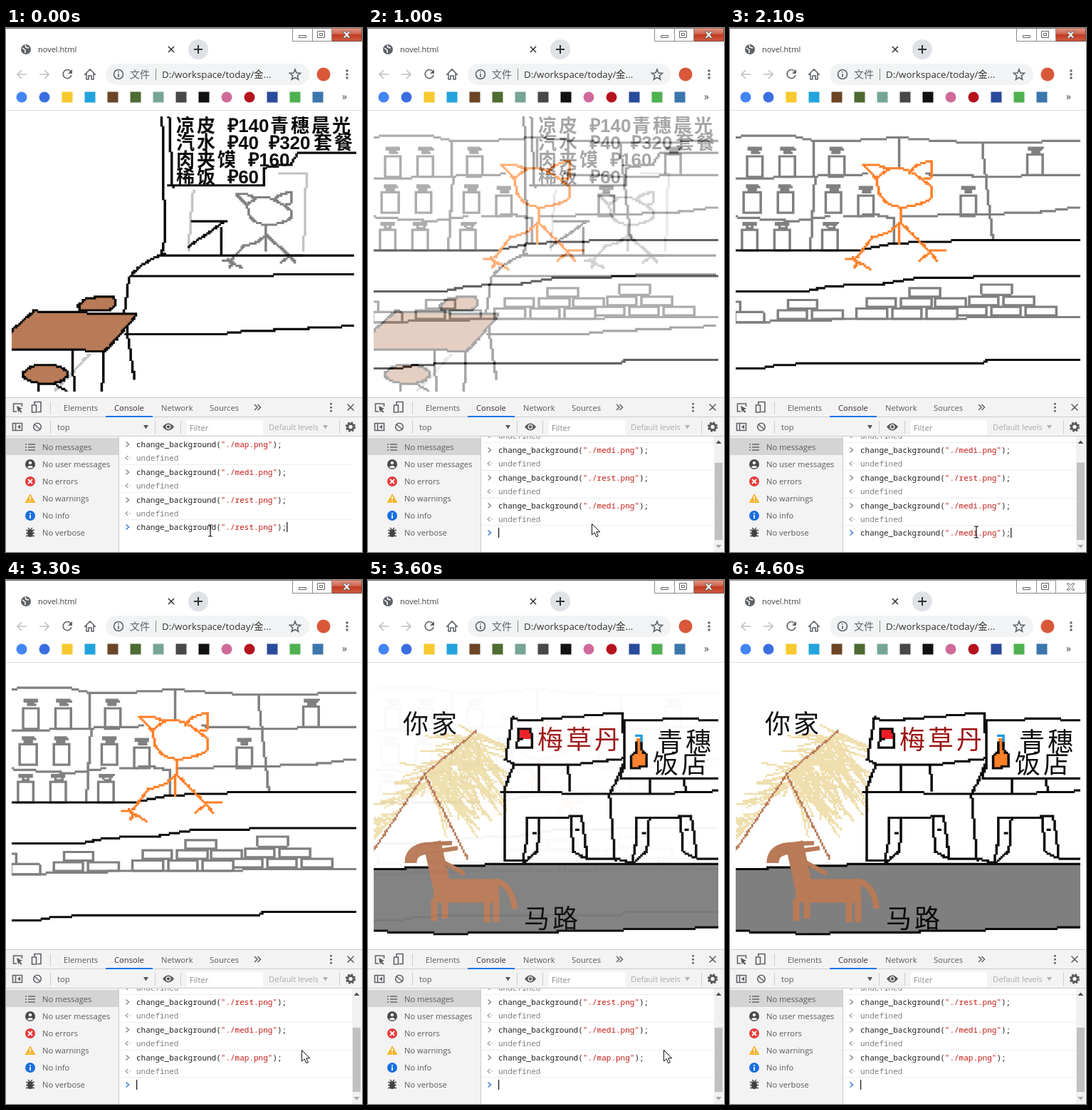
Write an HTML page that moves like this. It is 500 px wide and 735 px high and loops after 4.7 s.

```html
<!DOCTYPE html>
<html lang="zh-CN">
<head>
<meta charset="utf-8">
<title>novel.html</title>
<style>
html, body { margin: 0; width: 100%; height: 100%; overflow: hidden; background: #fff; }
svg { display: block; }
text { font-family: "Open Sans", "Noto Sans CJK SC", "Noto Sans CJK", sans-serif; white-space: pre; }
.ui { font-size: 11.2px; fill: #5a5a5a; }
.code text { font: 11px "Noto Sans Mono", monospace; fill: #222; }
.code .str { fill: #c41a16; }
.code .dim { fill: #808080; }
.hand, .menu { font-family: "Noto Sans CJK SC", "Noto Sans CJK", sans-serif; }
.hand { font-size: 36px; font-weight: 500; letter-spacing: 4px; }
.menu { font-size: 26px; font-weight: bold; letter-spacing: 3px; }
.price { font-family: "Liberation Sans", sans-serif; font-size: 26px; font-weight: bold; }
.ico { fill: none; stroke: #5f6368; stroke-width: 1.6; }
</style>
</head>
<body>
<svg id="stage" width="500" height="735" viewBox="0 0 500 735">
  <defs>
    <clipPath id="page"><rect x="8" y="124" width="484" height="386"/></clipPath>
    <clipPath id="log"><rect x="159" y="573" width="341" height="162"/></clipPath>
    <linearGradient id="red" x2="0" y2="1">
      <stop stop-color="#e39a8a"/><stop offset=".45" stop-color="#d0654f"/>
      <stop offset=".5" stop-color="#c03a22"/><stop offset="1" stop-color="#cf5a3f"/>
    </linearGradient>
  </defs>
  <rect width="500" height="735" fill="#fff"/>

  <!-- window frame and tab -->
  <path id="edge" d="M0 .5H500" stroke="#666"/>
  <path id="close" d="M457.5 0V18.5H499.5V0z" fill="url(#red)" stroke="#7b4a42"/>
  <path d="M402.5 0V18.5H457.5V0M430.5 0V18.5" fill="none" stroke="#8a8a8a"/>
  <g fill="#fff" stroke="#666">
    <path d="M411.5 10.5h10v3h-10zM437.5 4.5h10v9h-10zM440.5 7.5h4v3h-4z"/>
    <path d="M473 5h3.5l2 2.5 2-2.5h3.5l-3.7 4.5 3.7 4.5h-3.5l-2-2.5-2 2.5h-3.5l3.7-4.5z"/>
  </g>
  <circle cx="28" cy="30" r="7" fill="#5f6368"/>
  <path d="M23 28l4 3v4M27 24l1 3 4 1" fill="none" stroke="#fff" stroke-width="1.5"/>
  <text x="45" y="34" font-size="11" fill="#3c4043">novel.html</text>
  <path class="ico" d="M228 26l8 8M236 26l-8 8" style="stroke:#333"/>
  <circle cx="270" cy="30" r="14" fill="#dee1e6"/>
  <path d="M264 30h12M270 24v12" stroke="#333" stroke-width="2"/>

  <!-- navigation -->
  <path class="ico" d="M29 65H16M22 59l-6 6 6 6M47 65h13M54 59l6 6-6 6" style="stroke:#bfc1c4"/>
  <path class="ico" d="M91 61A6 6 0 1 0 92 66"/><path d="M93 58v6h-6z" fill="#5f6368"/>
  <path class="ico" d="M110 66l8-8 8 8M113 64v8h3v-5h4v5h3v-8"/>
  <rect x="140" y="50" width="286" height="30" rx="15" fill="#f1f3f4"/>
  <circle class="ico" cx="158" cy="65" r="6.5"/><path class="ico" d="M158 64v5M158 61v1.500"/>
  <text x="174" y="70" font-size="14" fill="#5f6368">文件</text>
  <path d="M210.5 57V73" stroke="#888"/>
  <text x="219" y="70" font-size="13.3" fill="#333">D:/workspace/today/金...</text>
  <path class="ico" d="M406 58l2 5 5.500.4-4.200 3.600 1.300 5.300-4.600-2.900-4.600 2.900 1.300-5.300-4.200-3.600 5.500-.4z"/>
  <circle cx="446" cy="65" r="9.5" fill="#d9583a"/>
  <path d="M479 58.500v13" stroke="#5f6368" stroke-width="3" stroke-dasharray="3 2"/>
  <g id="marks"></g>
  <text x="472" y="101" font-size="14" fill="#444">»</text>
  <path d="M0 115.500H500" stroke="#dcdcdc"/>

  <g id="rest" clip-path="url(#page)"></g>
  <g id="medi" clip-path="url(#page)"></g>
  <g id="map" clip-path="url(#page)"></g>

  <!-- developer tools -->
  <path d="M0 518H500V573H158V735H0z" fill="#f3f3f3"/>
  <rect y="575" width="158" height="24" fill="#d4d4d4"/>
  <path d="M0 518.500H500M0 545.500H500M0 572.500H500M158.500 573V735M62.500 524V541M62.500 551V569M209.500 551V569M245.500 551V569M468.500 551V569" stroke="#ccc"/>
  <rect x="140" y="544" width="66" height="2" fill="#1a73e8"/>
  <path class="ico" d="M15 538h-4.500v-11h12v4M40 528v-3.500h9v14h-5M36.500 529h6v10h-6z"/>
  <path d="M15 530l8 4-3.500 1.200 3 3-1.500 1.500-3-3-1 3z" fill="#5a5a5a"/>
  <g class="ui">
    <text x="81" y="537">Elements</text>
    <text x="152" y="537" style="fill:#333">Console</text>
    <text x="218" y="537">Network</text>
    <text x="286" y="537">Sources</text>
    <text x="72" y="564">top</text>
  </g>
  <path class="ico" d="M349 528l4 4-4 4M353.500 528l4 4-4 4M479.500 527.500l9 9M488.500 527.500l-9 9"/>
  <path d="M456.500 526v13" stroke="#555" stroke-width="2.500" stroke-dasharray="2.500 2.500"/>
  <path class="ico" d="M9.500 554.500h13v10h-13zM13.500 554v11"/><path d="M20 556.500v6l-4-3z" fill="#5a5a5a"/>
  <circle class="ico" cx="44" cy="559.500" r="5.300"/><path class="ico" d="M40 556l8 7"/>
  <path d="M193 557h7l-3.500 5.500z" fill="#555"/>
  <path d="M220 559.500q8-10 16 0q-8 10-16 0z" fill="#5a5a5a"/><circle cx="228" cy="559.500" r="2.800" fill="#5a5a5a" stroke="#f3f3f3" stroke-width="1.300"/>
  <rect x="254" y="550" width="107" height="21" fill="#fff"/>
  <text class="ui" x="258" y="565" style="fill:#8a8a8a">Filter</text>
  <text class="ui" x="369" y="564" style="fill:#ababab">Default levels</text>
  <path d="M445 557h7l-3.500 5.500z" fill="#b0b0b0"/>
  <g fill="none" stroke="#5a5a5a">
    <circle cx="484" cy="559.500" r="4.200" stroke-width="3"/>
    <circle cx="484" cy="559.500" r="6" stroke-width="2.400" stroke-dasharray="2.500 2.210"/>
  </g>
  <g id="side" class="ui"></g>
  <path d="M27 584h2m2 0h10M27 588h2m2 0h10M27 592h2m2 0h10" stroke="#666" stroke-width="1.500"/>
  <circle cx="34" cy="612" r="7" fill="#4a4a4a"/><circle cx="34" cy="610" r="2.300" fill="#f3f3f3"/><path d="M29.500 616q4.500-4 9 0q-4.500 3-9 0" fill="#f3f3f3"/>
  <circle cx="34" cy="636" r="7" fill="#e8393b"/><path d="M31 633l6 6M37 633l-6 6" stroke="#fff" stroke-width="1.800"/>
  <path d="M34 653l7.500 13h-15z" fill="#f5b52e"/><path d="M34 657v4.500M34 663v1.600" stroke="#fff" stroke-width="1.600"/>
  <circle cx="34" cy="684" r="7" fill="#1a6fe0"/><path d="M34 683v5M34 680v1.700" stroke="#fff" stroke-width="1.800"/>
  <ellipse cx="34" cy="708.500" rx="4" ry="5.500" fill="#444"/><path d="M28 704.500h12M28 708.500h12M28 712.500h12M31 701l2 2M37 701l-2 2" stroke="#444" stroke-width="1.500"/>

  <g clip-path="url(#log)"><g id="rows" class="code"></g></g>
  <g id="bar">
    <rect x="486" y="573" width="13" height="162" fill="#f1f1f1"/>
    <path d="M488.500 583l4-4.500 4 4.500z" fill="#505050"/><path d="M488.500 725l4 4.500 4-4.500z" fill="#a3a3a3"/>
    <rect id="thumb" x="487" width="11" fill="#c1c1c1"/>
  </g>
  <path id="arrow" d="M.5.500V16l3.700-3.300 2.500 6 2.600-1.100-2.500-5.800h4.900z" fill="#fff" stroke="#111"/>
  <path id="beam" d="M-3-8h2l1 1 1-1h2M0-7V7M-3 8h2l1-1 1 1h2" fill="none" stroke="#111" stroke-width="1.200"/>
</svg>
<script>
const $ = id => document.getElementById(id);
const BLACK = '#0a0a0a', GREY = '#808080', PALE = '#c3c3c3', BROWN = '#b97a57', ORANGE = '#ff7f27', STRAW = '#efdfae';
const GRID = 2.4;

function make(tag, attrs, text) {
  const e = document.createElementNS('http://www.w3.org/2000/svg', tag);
  for (const k in attrs) e.setAttribute(k, attrs[k]);
  if (text) e.textContent = text;
  return e;
}
const add = (g, ...spec) => g.appendChild(make(...spec));
const label = (g, cls, x, y, s, fill = BLACK) => add(g, 'text', { class: cls, x, y, fill }, s);
const area = (g, fill, d) => add(g, 'path', { d, fill });
const box = (x, y, w, h) => `M${x} ${y}h${w}v${h}h${-w}z`;
const paper = g => area(g, '#fff', box(0, 116, 500, 400));
const snap = v => Math.round(v / GRID) * GRID;

// Chunky brush: walks along a path and stamps blocks on a coarse grid.
function pen(g, fill, d, { w = 3.5, h = 3.1, sx = 1, sy = 1, dx = 0, dy = 0 } = {}) {
  const cells = new Set(), walk = make('path', {});
  for (const run of d.match(/M[^M]+/g)) {
    walk.setAttribute('d', run);
    const length = walk.getTotalLength();
    for (let s = 0; s < length + 2; s += 2) {
      const p = walk.getPointAtLength(Math.min(s, length));
      cells.add(box((snap(p.x * sx + dx) - w / 2).toFixed(1), (snap(p.y * sy + dy) - h / 2).toFixed(1), w, h));
    }
  }
  area(g, fill, [...cells].join(''));
}
function inked(g, fill, d) {
  area(g, fill, d);
  pen(g, BLACK, d);
}

const CAT = `M205 211L187 191H206L222 198Q240 194 256 203L270 213 284 224V238Q262 252 240 251 218 250 210 232L205 211 222 198
  M253 203Q262 188 284 187L282 210 270 213M240 251L237 302
  M239 272L225 286 200 294 177 323H164M172 321L180 330 174 336M180 328L197 338
  M239 272L280 313H302M280 313L290 327M279 316L266 326`;

function drawRest(g) {
  paper(g);
  pen(g, PALE, 'M263 228L256 313M384 204H422L418 313M117 458L70 508');
  pen(g, GREY, CAT, { sx: .8, dx: 174, sy: .7, dy: 100 });
  pen(g, BLACK, `M218 124L222 160 220 190 224 293 218 318H488M229 124L234 222M228 221H362L363 196 400 191 410 176H492
    M261 270H309L256 307M302 280V317M222 317Q178 334 172 356L166 402
    M175 348H354L390 346H488M168 430H298L330 426 488 418M169 418L180 491`);
  ['凉皮', '汽水', '肉夹馍', '稀饭'].forEach((s, i) => {
    label(g, 'menu', 239, 146 + 24 * i, s);
    label(g, 'price', 253 + 29 * s.length, 146 + 24 * i, '₽' + [140, 40, 160, 60][i]);
  });
  label(g, 'menu', 371, 146, '青穗晨光');
  label(g, 'price', 369, 170, '₽320');
  label(g, 'menu', 432, 170, '套餐');
  inked(g, BROWN, 'M101 389L112 380 130 377 152 378 154 389 145 396H104z');
  inked(g, BROWN, 'M39 397L184 402 155 436 138 454 90 451H0V432z');
  inked(g, BROWN, 'M24 485Q32 472 56 472 86 474 87 487 80 499 56 499 26 498 24 485z');
  pen(g, BLACK, 'M93 453L96 510M138 454L135 510M45 499V510M68 499L86 510');
}

const jar = (x, y) => box(x + 1, y + 2, 22, 29) + box(x + 4, y - 8, 17, 2) + box(x + 8, y - 4, 9, 3);

// Bricks in centred rows; each row up is shifted by lean.
const heap = (x, y, counts, lean) => counts.map((n, r) => Array.from({ length: n }, (_, i) =>
  box(x + lean * r + 49 * (i + (counts[0] - n) / 2), y - 15 * r, 42, 13)).join('')).join('');

function drawMedi(g) {
  paper(g);
  pen(g, GREY, `M8 153L40 150 86 151 118 158 200 157 237 153 262 156 354 162 492 158
    M117 158L119 215 113 311M237 153V197M354 162L369 296M8 212L192 205M276 205L352 208 492 207
    M8 265L90 271 140 264M160 264L205 262 230 267M242 264L365 261 430 259 492 251M231 268V302
    M8 413L150 409 300 409 360 405 492 406`);
  let jars = jar(417, 176) + jar(179, 232) + jar(322, 232);
  for (let r = 0; r < 3; r++)
    for (let c = 0; c < 3; c++) jars += jar(23 + 35 * c + 11 * c * c - 4 * r, 177 + 52 * r);
  pen(g, GREY, jars);
  pen(g, GREY, box(-20, 385, 34, 13) + box(8, 399, 39, 13) + heap(67, 396, [2, 1], -11) +
    heap(178, 394, [3, 3, 1], 13) + heap(318, 391, [3, 2, 1], -7));
  pen(g, BLACK, `M8 312H180L230 302 330 298 492 297M8 370H104L140 362 215 359 260 351 350 349H492
    M8 478H40L60 474 115 470H355L362 466H492`);
  pen(g, ORANGE, CAT);
}

function drawMap(g) {
  paper(g);
  let seed = 7;
  const rnd = (a, b) => a + (b - a) * ((seed = seed * 16807 % 2147483647) / 2147483647);
  let hay = '';
  for (let i = 0; i < 150; i++) {
    const u = rnd(0, 1), right = i % 5 < 3;
    const x = 152 - (right ? 72 : 136) * u, y = 214 + (right ? 62 : 140) * u;
    const ex = right ? Math.min(195, x + rnd(10, 75)) : Math.max(9, x - rnd(10, 60));
    hay += `M${x} ${y}L${ex} ${y + (right ? rnd(0, 92) : rnd(-14, 24))}`;
  }
  pen(g, STRAW, hay, { w: 2.6, h: 2.6 });
  pen(g, BROWN, 'M152 212L80 272 8 379M78 270L140 391', { w: 2.8, h: 2.6 });

  inked(g, '#7f7f7f', 'M0 407L100 402 180 399H500V488L400 489 330 492 120 496 50 495 0 491z');
  pen(g, BLACK, `M203 193L215 198 300 191 357 186 361 250 290 259 205 258 193 252zM361 196L400 197 430 194 492 197
    M361 196V262L354 272V279H492M205 258L190 298M241 259V297M281 260L284 296M360 256L341 298M186 298L405 300 492 296
    M192 299L191 394M339 299L347 394M396 280V298M444 280L446 296M191 393H217M308 391H350L372 398M464 390H492`);
  const door = 'M222 333L270 334 300 330 308 388H300L288 380 285 333M224 333L222 370 217 398 238 380 241 333M233 354h2M293 351h2';
  pen(g, BLACK, door);
  pen(g, BLACK, door, { dx: 154 });
  area(g, '#ed1c24', box(212, 210, 17, 13));
  pen(g, BLACK, 'M212 209H229L230 236H209zM211 224h6');
  area(g, ORANGE, 'M377 222H384L385 240 390 244V262L370 264V245L376 240z');
  pen(g, BLACK, 'M376 228V242L370 246V264L391 262 390 244 385 240V228');
  pen(g, '#1d9be0', 'M376 219H384V226');

  label(g, 'hand', 49, 215, '你家');
  label(g, 'hand', 238, 237, '梅草丹', '#9c1212');
  label(g, 'hand', 406, 240, '青穗');
  label(g, 'hand', 400, 271, '饭店');
  label(g, 'hand', 219, 488, '马路');

  const limb = (d, width) => add(g, 'path', { d, fill: 'none', stroke: BROWN, 'stroke-width': width });
  limb('M60 397Q60 375 92 376', 17);
  limb('M90 368L104 432', 25);
  limb('M92 370L118 369M98 380L126 376M106 396L136 412', 6);
  limb('M92 436H184', 33);
  limb('M93 448V478M108 448V475M167 448V480M180 448V480', 9);
  limb('M178 422Q202 426 206 461', 8);
}

drawRest($('rest'));
drawMedi($('medi'));
drawMap($('map'));

'#4285f4 #3a6fe2 #f6c92d #23a3de #6b4526 #4d6b33 #76a596 #484848 #111111 #cf6a9a #b5141d #2a4a9c #4fb14f #3b76ac'
  .split(' ').forEach((fill, i) => {
    const round = i < 2 || i === 9 || i === 10;
    add($('marks'), 'rect', { x: 14.5 + 32 * i, y: 89.5, width: 15, height: 15, rx: round ? 7.5 : 0, fill });
  });
['messages', 'user messages', 'errors', 'warnings', 'info', 'verbose'].forEach((s, i) =>
  add($('side'), 'text', { x: 51, y: 592 + 24 * i }, 'No ' + s));

// Console rows: commands and results alternate.
const rowY = i => Math.floor(584 + 19.5 * i);
const rule = g => add(g, 'path', { d: 'M159 -10.5H486', stroke: '#eee' });
function command(g, color) {
  add(g, 'path', { d: 'M168.5 -3.5l4 3.5-4 3.5', fill: 'none', stroke: color, 'stroke-width': 1.5 });
  const t = add(g, 'text', { x: 183, y: 4 });
  return s => {
    t.textContent = '';
    if (!s) return;
    add(t, 'tspan', {}, 'change_background(');
    add(t, 'tspan', { class: 'str' }, `"./${s}.png"`);
    add(t, 'tspan', {}, ');');
  };
}
const rows = ['map', '', 'medi', '', 'rest', '', 'medi', '', 'map', ''].map((s, i) => {
  const g = add($('rows'), 'g', { transform: `translate(0 ${rowY(i)})` });
  if (s) {
    if (i) rule(g);
    command(g, '#8a8a8a')(s);
  } else {
    add(g, 'path', { d: 'M171.5 -3l-3.5 3 3.5 3M173.5 0h1.5', fill: 'none', stroke: '#999', 'stroke-width': 1.2 });
    add(g, 'text', { class: 'dim', x: 183, y: 4 }, 'undefined');
  }
  return g;
});
const prompt = add($('rows'), 'g', {});
rule(prompt);
const type = command(prompt, '#2f7de1');
const caret = add(prompt, 'rect', { y: -7, width: 1.2, height: 14, fill: '#111' });

// Key presses: "up" recalls older commands, "enter" runs the shown one.
const keys = { 200: 'up', 850: 'enter', 1700: 'up', 1900: 'up', 2100: 'up', 2700: 'up', 3200: 'enter' };
function consoleAt(t) {
  const log = ['map', 'medi', 'rest'];
  let back = 1, ran = -Infinity;
  for (const at in keys) {
    if (+at > t) break;
    if (keys[at] === 'up') back++;
    else {
      log.push(log.at(-back));
      back = 0;
      ran = +at;
    }
  }
  return { text: back ? log.at(-back) : '', count: 2 * log.length - (t < ran + 100) };
}

// Pointer legs: start, end, then where it arrives, speeding up on the way.
const legs = [[300, 400, 289, 705], [600, 1200, 345, 682], [1200, 1500, 346, 707],
  [2100, 2400, 406, 680], [2600, 3000, 415, 659], [3700, 4300, -40, 760]];
function pointerAt(t) {
  let x = 287, y = 705;
  for (const [from, to, tx, ty] of legs) {
    const u = Math.min(1, Math.max(0, (t - from) / (to - from))) ** 2;
    x += (tx - x) * u;
    y += (ty - y) * u;
  }
  return [x, y];
}

const fades = [['medi', 855], ['map', 3300]].map(([id, delay]) => {
  const a = $(id).animate({ opacity: [0, 1] }, { delay, duration: 390, easing: 'ease', fill: 'both' });
  a.pause();
  return a;
});

function show(t) {
  for (const a of fades) a.currentTime = t;

  const { text, count } = consoleAt(t);
  const scroll = Math.max(0, Math.ceil(19.5 * count - 125)), full = 162 + scroll;
  rows.forEach((g, i) => g.style.display = i < count ? '' : 'none');
  $('rows').setAttribute('transform', `translate(0 ${-scroll})`);
  prompt.setAttribute('transform', `translate(0 ${rowY(count) - (count % 2 ? 0 : 1)})`);
  type(text);
  caret.setAttribute('x', 183 + (text ? (28 + text.length) * 6.6 : 0));
  $('bar').style.display = scroll ? '' : 'none';
  $('thumb').setAttribute('y', 589 + 129 * scroll / full);
  $('thumb').setAttribute('height', 129 * 162 / full);

  const [x, y] = pointerAt(t), overText = y > 700 && x > 160;
  $('arrow').style.display = overText ? 'none' : '';
  $('beam').style.display = overText ? '' : 'none';
  for (const id of ['arrow', 'beam'])
    $(id).setAttribute('transform', `translate(${Math.round(x)} ${Math.round(y)})`);

  const idle = t >= 4600;
  $('close').setAttribute('fill', idle ? '#fff' : 'url(#red)');
  $('close').setAttribute('stroke', idle ? '#8a8a8a' : '#7b4a42');
  $('edge').setAttribute('stroke', idle ? '#999' : '#666');
}

const start = performance.now();
let last = -1;
function tick() {
  const t = Math.floor((performance.now() - start) % 4700 / 100) * 100;
  if (t !== last) show(last = t);
  requestAnimationFrame(tick);
}
tick();
</script>
</body>
</html>
```
